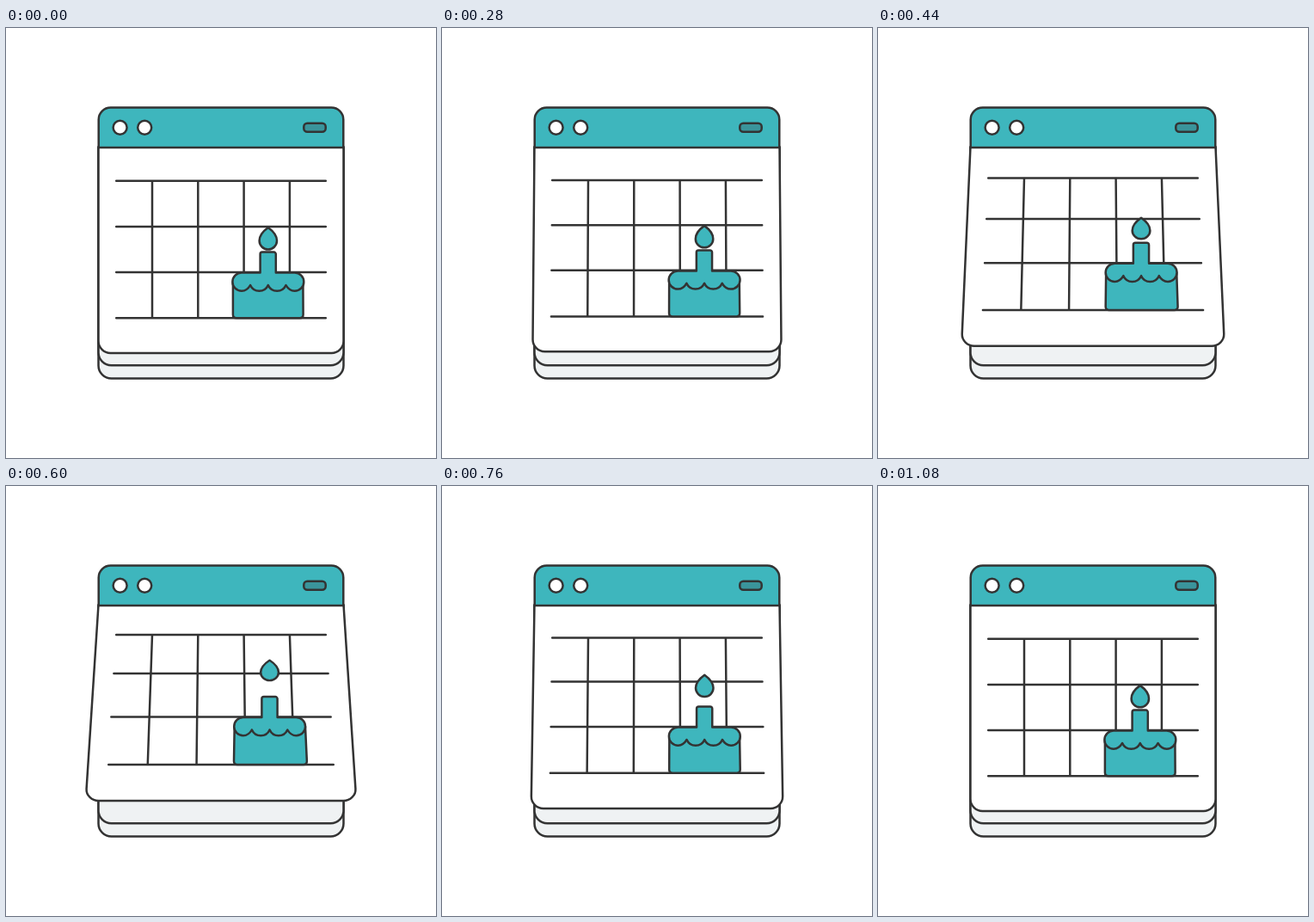
An HTML page that plays this animation: 500x500 px, repeating every 1.12 s.

```html
<!DOCTYPE html>
<html lang="en">
<head>
<meta charset="utf-8">
<title>Birthday calendar</title>
<style>
  html, body { margin: 0; width: 100%; height: 100%; overflow: hidden; background: #fff; }
  svg { display: block; width: 100vw; height: 100vh; }
  .ink { stroke: #333; stroke-width: 2.5; stroke-linecap: round; stroke-linejoin: round; }
  .teal { fill: #3eb6bd; }
  .white { fill: #fff; }
  .sheet { fill: #eff2f3; }
</style>
</head>
<body>
<svg viewBox="0 0 500 500">
  <g class="ink sheet">
    <path d="M107.5 139V392.5a15 15 0 0 0 15 15H377.5a15 15 0 0 0 15-15V139"/>
    <path d="M107.5 139V377.3a15 15 0 0 0 15 15H377.5a15 15 0 0 0 15-15V139"/>
  </g>
  <path id="page" class="ink white"/>
  <path id="grid" class="ink" fill="none"/>
  <g class="ink teal">
    <path id="body"/>
    <path id="icing" d="M274 284.6H295.6V263a2.4 2.4 0 0 1 2.4-2.4H311.4a2.4 2.4 0 0 1 2.4 2.4V284.6H335.7
      A10.6 10.6 0 0 1 335.7 305.8Q329.2 305.6 325.5 299A11.3 11.3 0 0 1 304.8 299
      A11.3 11.3 0 0 1 284.1 299Q280.4 305.6 274 305.8A10.6 10.6 0 0 1 274 284.6Z"/>
    <path id="flame" d="M304.8 232C309.2 235.2 315 241.3 315 247.3A10.2 10.2 0 0 1 294.6 247.3
      C294.6 241.3 300.4 235.2 304.8 232Z"/>
    <path d="M107.7 139V106.5a14 14 0 0 1 14-14H378.3a14 14 0 0 1 14 14V139Z"/>
  </g>
  <g class="ink white">
    <circle cx="132.6" cy="115.7" r="8"/>
    <circle cx="161.2" cy="115.7" r="8"/>
    <rect x="346.3" y="110.8" width="25.4" height="10" rx="4" style="fill:#3a949b"/>
  </g>
</svg>
<script>
  const LOOP = 1120, STEP = 40, HALF = LOOP / 2, PEAK = 1.04;
  const $ = id => document.getElementById(id);
  const page = $('page'), grid = $('grid'), body = $('body'), icing = $('icing'), flame = $('flame');

  // Ease from (0,0) to (1,1) with flat tangents of horizontal reach a and b.
  function ease(u, a, b) {
    let lo = 0, hi = 1;
    for (let i = 0; i < 24; i++) {
      const s = (lo + hi) / 2, r = 1 - s;
      if (3 * a * s * r * r + 3 * b * s * s * r + s * s * s < u) lo = s; else hi = s;
    }
    return lo * lo * (3 - 2 * lo);
  }

  const liftAt = t => PEAK * (t < HALF
    ? ease(t / HALF, 1, 0.64)
    : 1 - ease(t / HALF - 1, 0.24, 0));

  // The flame hops off the candle and settles back.
  function hopAt(t) {
    const start = 400, top = 620;
    if (t < start) return 0;
    if (t < top) {
      const u = (t - start) / (top - start);
      return 16.3 * u * u * (3 - 2 * u);
    }
    return 16.3 * (1 - (t - top) / (LOOP - top)) ** 2;
  }

  function pagePath(k) {
    const x = 107.5 - 14 * k, y = 364 - 12 * k, end = 378 - 12 * k, m = v => 500 - v;
    return `M107.5 138L${x} ${y}C${x - 0.5 * k} ${y + 7.7} ${x + 6.3} ${end} ${x + 14} ${end}` +
      `H${m(x + 14)}C${m(x + 6.3)} ${end} ${m(x - 0.5 * k)} ${y + 7.7} ${m(x)} ${y}L392.5 138`;
  }

  // Each row: resting y, rise, half-width gain.
  const rows = [[177.8, 4.9, 0], [231, 13, 2.8], [284, 15.6, 5.9], [337.3, 13.3, 9]];

  function gridPath(k) {
    const ys = rows.map(([y, rise]) => y - rise * k);
    const across = rows.map(([, , gain], i) => {
      const half = 121.8 + gain * k;
      return `M${250 - half} ${ys[i]}H${250 + half}`;
    });
    const down = [170, 223.3, 276.6, 329.9].map(x =>
      `M${x} ${ys[0]}L${x + (x - 250) * 0.066 * k} ${ys[3]}`);
    return across.concat(down).join('');
  }

  function bodyPath(k) {
    const top = 295 - 15.5 * k, end = 337.3 - 13.3 * k, l = 263.9 + 1.1 * k, r = 345.6 + 4.3 * k;
    return `M${263.9 + 1.8 * k} ${top}L${l} ${end - 4}Q${l} ${end} ${l + 4} ${end}` +
      `H${r - 4}Q${r} ${end} ${r} ${end - 4}L${345.4 + 2.6 * k} ${top}Z`;
  }

  function draw(t) {
    const k = liftAt(t);
    page.setAttribute('d', pagePath(k));
    grid.setAttribute('d', gridPath(k));
    body.setAttribute('d', bodyPath(k));
    icing.setAttribute('transform', `translate(${1.8 * k} ${-15.6 * k})`);
    flame.setAttribute('transform',
      `translate(${304.8 + 1.75 * k} ${257.5 - 15.5 * k - hopAt(t)}) ` +
      `scale(${1 + 0.02 * k} ${1 - 0.08 * k * k}) translate(-304.8 -257.5)`);
  }

  function tick() {
    draw(Math.floor(performance.now() % LOOP / STEP) * STEP);
    requestAnimationFrame(tick);
  }
  tick();
</script>
</body>
</html>
```
